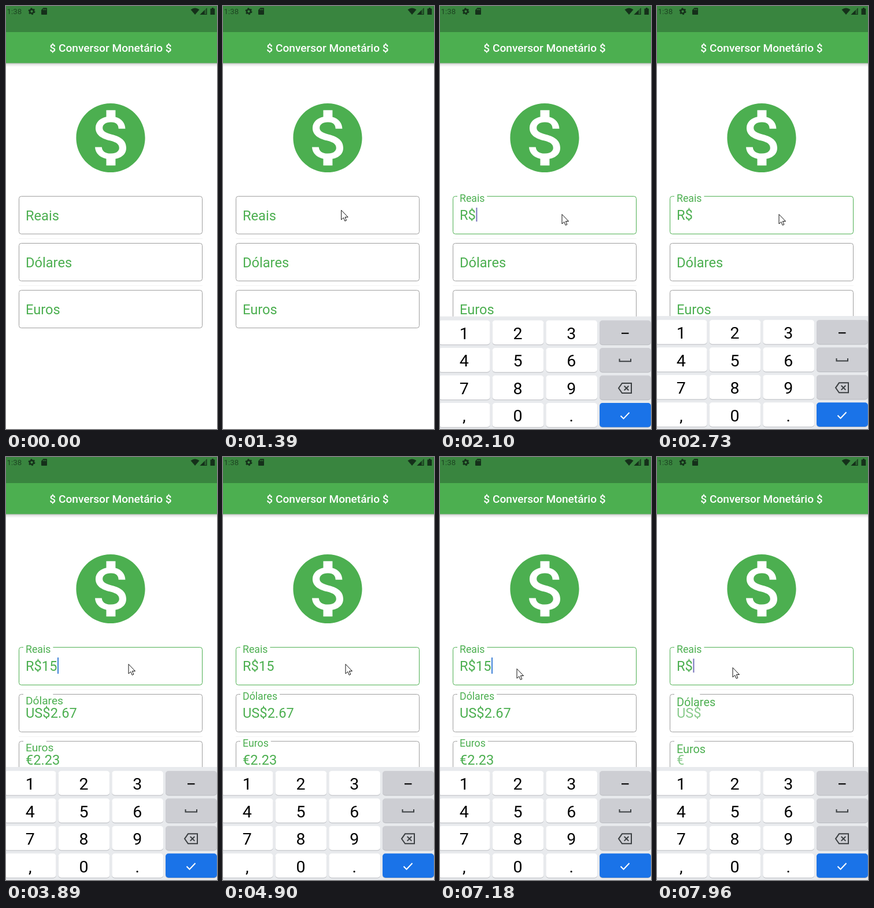
Write an HTML page that moves like this. It is 365x730 px and loops after 8000 ms.

```html
<!DOCTYPE html>
<html lang="pt">
<head>
<meta charset="utf-8">
<title>Conversor</title>
<style>
  html, body { margin: 0; width: 100%; height: 100%; overflow: hidden; background: #fff; }
  svg { display: block; width: 100%; height: 100%; font-family: Roboto, sans-serif; }
  .field { font-size: 23.65px; fill: #4caf50; }
  .key { font-size: 28.5px; text-anchor: middle; }
  .icon { fill: none; stroke: #3c4043; stroke-width: 2; }
</style>
</head>
<body>
<svg id="stage" viewBox="0 0 365 730">
  <defs>
    <linearGradient id="shade" x2="0" y2="1">
      <stop stop-opacity=".3"/><stop offset=".4" stop-opacity=".1"/><stop offset="1" stop-opacity="0"/>
    </linearGradient>
  </defs>
  <rect width="365" height="730" fill="#fff"/>

  <rect y="98" width="365" height="7" fill="url(#shade)"/>
  <rect y="44" width="365" height="54.5" fill="#4caf50"/>
  <rect width="365" height="45" fill="#39853f"/>
  <text x="181" y="79" font-size="19.1" font-weight="500" fill="#fff" text-anchor="middle">$ Conversor Monetário $</text>

  <g fill="#15301a">
    <text x="1.5" y="14.4" font-size="13.3" fill="#1d4422">1:38</text>
    <g fill="none" stroke="#15301a">
      <circle cx="44.5" cy="9.3" r="3.4" stroke-width="2.6"/>
      <circle cx="44.5" cy="9.3" r="5.1" stroke-width="1.8" stroke-dasharray="2.7 2.64"/>
    </g>
    <path d="M64.5 3.3H70a1 1 0 0 1 1 1V14a1 1 0 0 1-1 1H62a1 1 0 0 1-1-1V7Z"/>
    <path d="M64.6 5v2.2M66.7 5v2.2M68.8 5v2.2" stroke="#39853f"/>
    <path d="M319.5 6.2Q327 .6 334.5 6.2L327 15Z"/>
    <path d="M335.5 15 347.5 3V15Z" opacity=".4"/>
    <path d="M335.5 15 343.5 7V15ZM346.4 4.5 347.5 3.4V15H335.5L336.6 13.9H346.4Z"/>
    <path d="M353.5 4.5H356V3h3V4.5h2.2V15H353.5Z"/>
  </g>

  <path fill="#4caf50" transform="translate(181 227.5) scale(5.96) translate(-12 -12)" d="M12 2C6.48 2 2 6.48 2 12s4.48 10 10 10 10-4.48 10-10S17.52 2 12 2zm1.41 16.09V20h-2.67v-1.93c-1.71-.36-3.16-1.46-3.27-3.4h1.96c.1 1.05.82 1.87 2.65 1.87 1.96 0 2.4-.98 2.4-1.59 0-.83-.44-1.61-2.67-2.14-2.48-.6-4.18-1.62-4.18-3.67 0-1.72 1.39-2.84 3.11-3.21V4h2.67v1.95c1.86.45 2.79 1.86 2.85 3.39H14.3c-.05-1.11-.64-1.87-2.22-1.87-1.5 0-2.4.68-2.4 1.64 0 .84.65 1.39 2.67 1.91s4.18 1.39 4.18 3.91c-.01 1.83-1.38 2.83-3.12 3.16z"/>

  <path d="M22 401.5H340M22 482.5H340" stroke="#f3f3f3"/>
  <g id="form"></g>
  <rect id="caret" width="2"/>
  <g id="keyboard"><rect width="365" height="200" fill="#e8eaed"/></g>
  <path id="pointer" d="M0 0V16.5L3.8 13 6.2 18.8 8.8 17.7 6.4 12H11.5Z" fill="#fff" stroke="#111"/>
</svg>
<script>
const LOOP = 8000, TICK = 78.2, FIRST_TICK = 836;
const $ = id => document.getElementById(id);

function add(parent, tag, attrs, text) {
  const node = document.createElementNS('http://www.w3.org/2000/svg', tag);
  set(node, attrs);
  if (text) node.textContent = text;
  return parent.appendChild(node);
}
function set(node, attrs) {
  for (const name in attrs) node.setAttribute(name, attrs[name]);
}

// Keyboard
const rows = [['1', '2', '3', ''], ['4', '5', '6', ''], ['7', '8', '9', ''], [',', '0', '.', '']];
rows.forEach((row, r) => row.forEach((char, c) => {
  const x = -2.2 + 92.75 * c, y = 6.8 + 47.5 * r;
  const box = { x, width: 88.8, height: 41.7, rx: 5 };
  const side = r === 3 ? '#1a73e8' : '#cdced3';
  add($('keyboard'), 'rect', { ...box, y: y + 1, fill: '#b9bbc0' });
  add($('keyboard'), 'rect', { ...box, y, fill: c < 3 ? '#fff' : side });
  if (char) add($('keyboard'), 'text', { x: 41.8 + 92.75 * c, y: y + 32.2, class: 'key' }, char);
}));
const icons = add($('keyboard'), 'g', { class: 'icon' });
add(icons, 'path', { d: 'M314 29.2h12.5', stroke: '#111', 'stroke-width': 2.3 });
add(icons, 'path', { d: 'M310.5 73v4.6h19.5v-4.6' });
add(icons, 'path', { d: 'M315 115.3H331V132.3H315L309 123.8ZM318.7 120l7.6 7.6m0-7.6l-7.6 7.6' });
add(icons, 'path', { d: 'M312.5 171.5l5 5 10-10.5', stroke: '#fff' });

// Form fields
const fields = [['Reais', 'R$'], ['Dólares', 'US$'], ['Euros', '€']].map(([name, symbol], i) => {
  const top = 328.4 + 81.1 * i;
  const group = add($('form'), 'g', { class: 'field' });
  const border = add(group, 'rect', { x: 22.5, y: top, width: 317, height: 65, rx: 4, fill: 'none' });
  const notch = add(group, 'rect', { x: 30, y: top - 2, height: 4, fill: '#fff' });
  const line = add(group, 'text', { x: 34, y: top + 40.3 });
  const prefix = add(line, 'tspan', {}, symbol);
  const value = add(line, 'tspan', {});
  const label = add(group, 'text', {}, name);
  return { top, border, notch, prefix, value, label };
});

function drawField(field, lift, text, focused) {
  const scale = 1 - lift / 4;
  const gap = (field.label.getComputedTextLength() * .75 + 8) * lift;
  set(field.border, { stroke: focused ? '#4caf50' : '#9e9e9e' });
  set(field.notch, { width: gap });
  set(field.label, { transform: `translate(34 ${field.top + 41.2 - 32 * lift}) scale(${scale})` });
  set(field.prefix, { 'fill-opacity': text ? 1 : lift });
  field.value.textContent = text;
}

// Standard curve: cubic-bezier(.4, 0, .2, 1)
function ease(x) {
  if (x <= 0) return 0;
  if (x >= 1) return 1;
  let low = 0, high = 1, s;
  for (let i = 0; i < 20; i++) {
    s = (low + high) / 2;
    const bx = 1.2 * s * (1 - s) ** 2 + .6 * s * s * (1 - s) + s ** 3;
    if (bx < x) low = s; else high = s;
  }
  return s * s * (3 - 2 * s);
}

// Pointer path: tick, x, y
const path = [
  [0, 355, 504], [3, 261, 402], [5, 192, 338], [8, 211, 359.5], [30, 211, 359.5], [32, 212, 357.5],
  [56, 212, 357.5], [62, 179, 450.5], [64, 179, 450.5], [68, 187, 534], [74, 151, 492],
  [81, 133, 365.5], [82, 133, 365.5], [84, 131, 363.5], [99, 131, 363.5]
];
function pointerAt(tick) {
  const i = path.findIndex(point => point[0] > tick);
  const [t0, x0, y0] = path[i - 1], [t1, x1, y1] = path[i];
  const u = (tick - t0) / (t1 - t0);
  return [x0 + (x1 - x0) * u, y0 + (y1 - y0) * u];
}

const caretToggles = [13, 24, 31, 45, 52, 58, 64, 71, 77, 83, 88];

function typedAt(tick) {
  if (tick < 37 || tick >= 91) return '';
  return tick < 39 || tick >= 88 ? '1' : '15';
}

function draw(now) {
  const tick = Math.floor((now % LOOP - FIRST_TICK) / TICK);
  const time = 840 + tick * TICK;
  const typed = typedAt(tick);
  const amount = tick < 38 ? 0 : +typed;
  const convert = rate => amount ? (amount * rate).toFixed(2) : '';
  const lift = tick >= 91 ? .65 : ease((time - 3809) / 167);

  drawField(fields[0], ease((time - 1936) / 167), typed, tick > 14);
  drawField(fields[1], lift, convert(.178));
  drawField(fields[2], lift, convert(.1487));

  const caretOn = caretToggles.filter(t => t <= tick).length % 2;
  set($('caret'), {
    x: 62.4 + 13.3 * typed.length,
    y: typed ? 346 : 348,
    height: typed ? 28 : 24,
    fill: typed ? '#3f82d8' : '#7874bd',
    opacity: caretOn
  });

  set($('keyboard'), { transform: `translate(0 ${730 - 195 * ease((time - 1815) / 300)})` });

  set($('pointer'), { visibility: tick < 0 ? 'hidden' : 'visible' });
  if (tick >= 0) set($('pointer'), { transform: `translate(${pointerAt(tick)})` });
}

function play() {
  draw(performance.now());
  requestAnimationFrame(play);
}
play();
</script>
</body>
</html>
```
